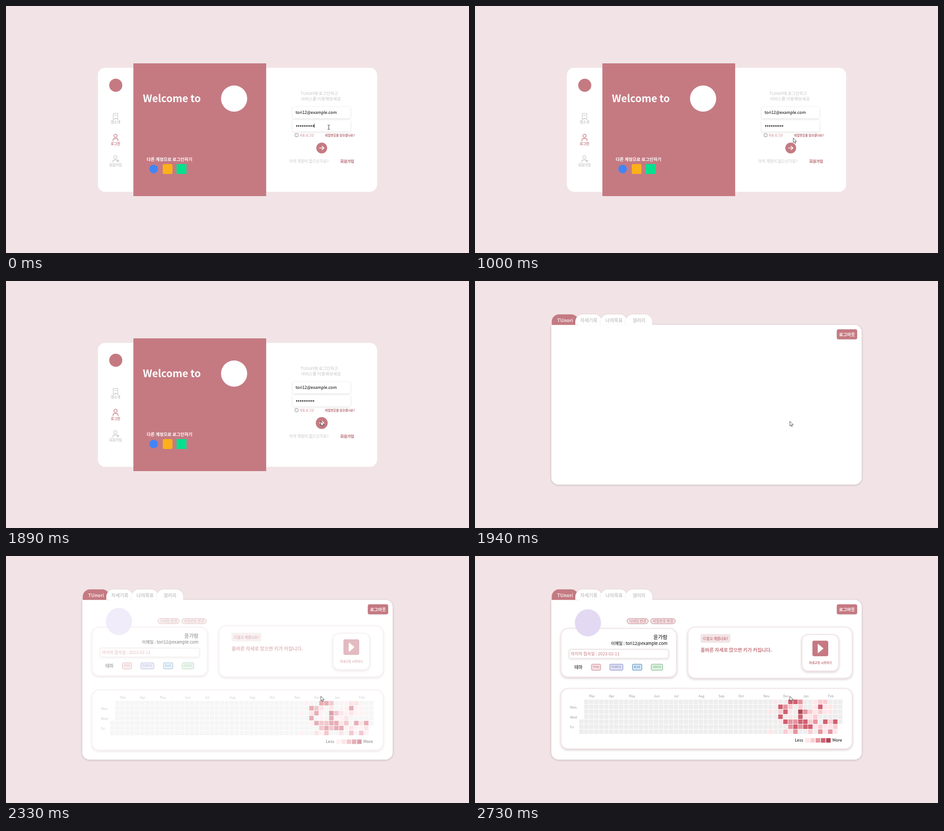
An HTML page with a canvas that plays this animation: 1025 px wide and 547 px high, repeating every 4310 ms.

```html
<!DOCTYPE html>
<html lang="ko">
<head>
<meta charset="utf-8">
<title>Login</title>
<style>
html, body { margin: 0; width: 100%; height: 100%; overflow: hidden; background: #f2e4e6; }
canvas { display: block; width: 1025px; height: 547px; }
</style>
</head>
<body>
<canvas id="stage"></canvas>
<script>
const W = 1025, H = 547, LOOP = 4310;
const ROSE = '#c57a82', BLUSH = '#f2e4e6', GREY = '#c9c9c9';
const FONT = '"Noto Sans CJK KR", "Noto Sans CJK", "Noto Sans", sans-serif';
const BRAND = 'TUnori', EMAIL = 'tori12@example.com';
const dpr = window.devicePixelRatio || 1;

let ctx;

function setup(canvas) {
  canvas.width = W * dpr;
  canvas.height = H * dpr;
  const c = canvas.getContext('2d');
  c.scale(dpr, dpr);
  return c;
}

const stage = setup(document.getElementById('stage'));

function layer(paint) {
  const canvas = document.createElement('canvas');
  ctx = setup(canvas);
  paint();
  ctx = stage;
  return canvas;
}

function text(str, x, y, size, color, weight = 400, align = 'left') {
  ctx.font = `${weight} ${size}px ${FONT}`;
  ctx.textAlign = align;
  ctx.textBaseline = 'middle';
  ctx.fillStyle = color;
  ctx.fillText(str, x, y);
}

// Rounded box given by its edges, with optional border and shadow.
function box(x1, y1, x2, y2, r, fill, { border, line = 1, blur = 0, dy = 0, shade = 'rgba(0,0,0,.15)' } = {}) {
  ctx.save();
  ctx.beginPath();
  ctx.roundRect(x1, y1, x2 - x1, y2 - y1, r);
  if (blur) {
    ctx.shadowColor = shade;
    ctx.shadowBlur = blur * dpr;
    ctx.shadowOffsetY = dy * dpr;
  }
  ctx.fillStyle = fill;
  ctx.fill();
  ctx.restore();
  if (border) {
    const h = line / 2;
    ctx.beginPath();
    ctx.roundRect(x1 + h, y1 + h, x2 - x1 - line, y2 - y1 - line, r);
    ctx.strokeStyle = border;
    ctx.lineWidth = line;
    ctx.stroke();
  }
}

function disc(x, y, r, fill) {
  ctx.beginPath();
  ctx.arc(x, y, r, 0, Math.PI * 2);
  ctx.fillStyle = fill;
  ctx.fill();
}

function stroke(d, color, width, fill) {
  const path = new Path2D(d);
  if (fill) { ctx.fillStyle = fill; ctx.fill(path); }
  ctx.strokeStyle = color;
  ctx.lineWidth = width;
  ctx.lineJoin = ctx.lineCap = 'round';
  ctx.stroke(path);
}

function person(x, y, color) {
  stroke(`M${x - 3.6} ${y}a3.6 3.6 0 1 0 7.2 0a3.6 3.6 0 1 0 -7.2 0
    M${x - 5.5} ${y + 11}v-1.5q0 -3.5 3.5 -3.5h4q3.5 0 3.5 3.5v1.5`, color, 1.4);
}

function paintLogin() {
  box(203.5, 137, 821.5, 411.5, 16, '#fff');
  box(282, 127, 576, 421, 0, ROSE);

  disc(243, 175.5, 14.5, ROSE);
  stroke('M237.5 237.8h10v14l-5 -3.6l-5 3.6zM240.3 242.3h4.6', GREY, 1.3);
  text('앱소개', 242.5, 257.5, 7.6, GREY, 700, 'center');
  person(242.5, 287.5, ROSE);
  text('로그인', 242.5, 305, 7.6, ROSE, 700, 'center');
  person(242, 335, GREY);
  stroke('M248 340.5v5M245.5 343h5', GREY, 1.3);
  text('회원가입', 242.5, 352.5, 7.6, GREY, 700, 'center');

  text('Welcome to', 303, 204.5, 22.4, '#fff', 700);
  disc(505, 205, 29, '#fff');
  text('다른 계정으로 로그인하기', 311.5, 339, 9.55, '#fff', 700);
  disc(326.8, 361, 9.5, '#4285f4');
  box(347, 350, 368.5, 372, 3, '#fbb01c');
  box(377.5, 350, 399.5, 372, 0, '#05e08f');

  text(BRAND + '에 로그인하고', 652, 193, 9.3, '#c4c4c4', 500);
  text('서비스를 이용해보세요', 652.5, 205.5, 9.45, '#c4c4c4', 500);
  for (const y of [223.5, 253]) box(634.5, y, 762.5, y + 25, 2, '#fff', { blur: 5, dy: 1, shade: 'rgba(0,0,0,.13)' });
  text(EMAIL, 641, 235.5, 9.2, '#000');
  for (let i = 0; i < 10; i++) disc(643.6 + i * 4.15, 265.7, 1.35, '#000');

  box(639.5, 282.3, 647.3, 290, 1.5, '#fff', { border: '#777', line: .9 });
  text('자동 로그인', 650, 286, 6.6, ROSE, 500);
  text('비밀번호를 잊으셨나요?', 706.5, 286, 6.6, '#b0606a', 700);
  text('아직 계정이 없으신가요?', 627, 343.7, 8.6, '#c4c4c4', 500);
  text('회원가입', 740, 343.7, 8.4, '#b0606a', 700);
}

function paintBoard() {
  box(169, 97, 856, 451, [0, 16, 16, 16], '#fff', { blur: 5, dy: 1, shade: 'rgba(0,0,0,.2)' });
  ctx.save();
  ctx.beginPath();
  ctx.rect(160, 60, 260, 37.3);
  ctx.clip();
  [BRAND, '자세기록', '나의목표', '갤러리'].forEach((name, i) => {
    const x = [170, 222, 278, 333.5][i];
    box(x, 74, x + 59, 100, [16, 16, 0, 0], i ? '#fff' : ROSE, { blur: 3, shade: 'rgba(0,0,0,.12)' });
    text(name, [199.5, 252, 308, 363][i], 87.5, 10.3, i ? GREY : BLUSH, 700, 'center');
  });
  ctx.restore();
  box(801, 107, 846, 129, 4, ROSE, { blur: 3, dy: 1 });
  text('로그아웃', 823.5, 118, 9.5, '#fff', 700, 'center');
}

function card(x1, y1, x2, y2, r = 16) {
  box(x1, y1, x2, y2, r, '#fff', { border: BLUSH, line: 2, blur: 5, dy: 2, shade: 'rgba(70,20,30,.22)' });
}

function paintBadges() {
  const badge = (x1, x2, str) => {
    box(x1, 138, x2, 150.5, 6, BLUSH, { border: ROSE, line: .9 });
    text(str, (x1 + x2) / 2, 144.2, 7.8, ROSE, 400, 'center');
  };
  badge(336, 384, '닉네임 변경');
  badge(388.5, 444, '비밀번호 변경');
}

function paintProfile() {
  card(189.5, 159.5, 447, 269);
  ctx.beginPath();
  ctx.ellipse(250, 148, 29, 30, 0, 0, Math.PI * 2);
  ctx.fillStyle = '#e3d9f3';
  ctx.fill();

  text('윤가람', 426, 180, 11.3, '#000', 500, 'right');
  text('이메일 : ' + EMAIL, 426, 193, 9.3, '#000', 400, 'right');
  box(207.5, 206, 429, 227.5, 4, '#fff', { border: BLUSH, line: 2, blur: 4, dy: 1 });
  text('마지막 접속일 : 2023-02-11', 212, 216.5, 9.3, ROSE, 500);
  text('테마', 220, 246, 9.8, '#000');
  const themes = [
    ['PINK', 257.5, 278.5, '#c57a82', '#f6e1e4'],
    ['PURPLE', 298, 328, '#7d83c2', '#e0e1f3'],
    ['BLUE', 348, 370, '#4884b5', '#d5e6f4'],
    ['GREEN', 389.5, 416, '#72ae7b', '#dff2e1'],
  ];
  for (const [name, x1, x2, color, fill] of themes) {
    box(x1, 239, x2, 253.5, 2.5, fill, { border: color });
    text(name, (x1 + x2) / 2, 246.2, 5.9, color, 500, 'center');
  }

  card(470.5, 156.5, 836, 271.5);
  box(499.5, 173, 565, 192, 4, BLUSH, { blur: 3, shade: 'rgba(0,0,0,.06)' });
  stroke('M505 182.6a3.2 3.2 0 1 0 6.4 0a3.2 3.2 0 1 0 -6.4 0M508.2 182.3v2M508.2 180.8v.1', ROSE, .8);
  text('알고 계셨나요?', 512.3, 182.7, 7.7, ROSE, 700);
  text('올바른 자세로 앉으면 키가 커집니다.', 499.5, 208.5, 10.5, ROSE, 700);
  card(723, 173, 806, 255.5, 14);
  box(747, 187.5, 782, 222, 4, ROSE);
  stroke('M759.5 195.5l11 9.3l-11 9.3z', '#fff', 1.5, '#fff');
  text('자세교정 시작하기', 764.7, 236, 6.65, ROSE, 700, 'center');
}

function paintCalendar() {
  const levels = ['#eeeeee', '#ffe6e9', '#f9cdd2', '#e4959f', '#cf6070', '#b04655'];
  const recent = ['010044300122000', '004320200141100', '102410532121100', '004010411200000',
    '001433442304240', '00003434412112', '10021300203131'];
  const firstRecent = 38, colX = i => 230.5 + i * 11.02;
  const cell = (x, y, level) => { ctx.fillStyle = levels[level]; ctx.fillRect(x, y, 10, 10); };

  card(189.5, 292.5, 836, 428);
  const months = { Mar: 2, Apr: 6, May: 10, Jun: 15, Jul: 19, Aug: 24, Sep: 28, Oct: 32, Nov: 37, Dec: 41, Jan: 45, Feb: 50 };
  for (const m in months) text(m, colX(months[m]), 310.3, 7.3, '#999', 500);
  ['Mon', 'Wed', 'Fri'].forEach((d, i) => text(d, 210.5, 335.3 + i * 22, 7.3, '#999', 500));

  recent.forEach((row, r) => {
    const end = firstRecent + row.length;
    for (let c = r < 4 ? 1 : 0; c < end; c++) {
      cell(colX(c), 318 + r * 11, c < firstRecent ? 0 : +row[c - firstRecent]);
    }
  });

  text('Less', 708, 408, 9.2, '#000');
  for (let i = 1; i < 6; i++) cell(719.3 + i * 11.6, 403.3, i);
  text('More', 791, 408, 9.2, '#000');
}

const login = layer(paintLogin);
const board = layer(paintBoard);
const badges = layer(paintBadges);
const profile = layer(paintProfile);
const calendar = layer(paintCalendar);

const progress = (t, from, to) => Math.min(1, Math.max(0, (t - from) / (to - from)));
const smooth = p => p * p * (3 - 2 * p);
const place = (image, dy = 0) => ctx.drawImage(image, 0, dy, W, H);

const pointers = {
  beam() { stroke('M-2.3 -4.8h1.6l.7 .6l.7 -.6h1.6M-2.3 4.8h1.6l.7 -.6l.7 .6h1.6M0 -4.2v8.4', '#222', .9); },
  arrow() { stroke('M0 0v10l2.3 -2.2l1.7 3.9l1.7 -.8l-1.7 -3.7h3.2z', '#222', .8, '#fff'); },
  hand() {
    stroke(`M-1.2 .8q1.2 -1.6 2.4 0v4.8q1.2 -1 2 .3q1.3 -.8 2 .5q1.4 -.5 1.7 .9v3.2l-1.2 2.4v1.8h-5.2
      v-1.6l-3.8 -4.8q-.6 -1.9 1 -1.5l1.1 1.3z`, '#222', .9, '#fff');
  },
};

function drawPointer(kind, x, y) {
  ctx.save();
  ctx.translate(x, y);
  pointers[kind]();
  ctx.restore();
}

function drawLogin(t) {
  place(login);
  const caretOn = t < 710 || (t >= 1270 && t < 1530);
  if (caretOn) { ctx.fillStyle = '#000'; ctx.fillRect(681.7, 260.7, 1, 9); }
  disc(699, 314.5, 12 + 1.2 * smooth(progress(t, 1090, 1270)), ROSE);
  stroke('M694 314.5h9.5M699.8 310.6l4 3.9l-4 3.9', '#fff', 1.6);
}

function drawDashboard(t) {
  place(board);
  const shown = 1 - Math.pow(1 - progress(t, 2070, 2730), 1.4);
  if (!shown) return;
  const shift = 6 * (1 - shown);
  ctx.globalAlpha = shown;
  place(profile, -shift);
  place(badges);
  place(calendar, shift);
  ctx.globalAlpha = 1;
}

function draw(t) {
  ctx.fillStyle = BLUSH;
  ctx.fillRect(0, 0, W, H);
  if (t < 1940) drawLogin(t); else drawDashboard(t);

  const move = smooth(progress(t, 725, 1230));
  const x = 714.5 - 17.5 * move, y = 268.5 + 42.5 * move;
  const overButton = Math.hypot(x - 699, y - 314.5) < 12;
  const kind = t >= 1860 ? 'arrow' : y < 278 ? 'beam' : overButton ? 'hand' : 'arrow';
  drawPointer(kind, x, y);
}

const start = performance.now();
function frame() {
  draw((performance.now() - start) % LOOP);
  requestAnimationFrame(frame);
}
frame();
</script>
</body>
</html>
```
